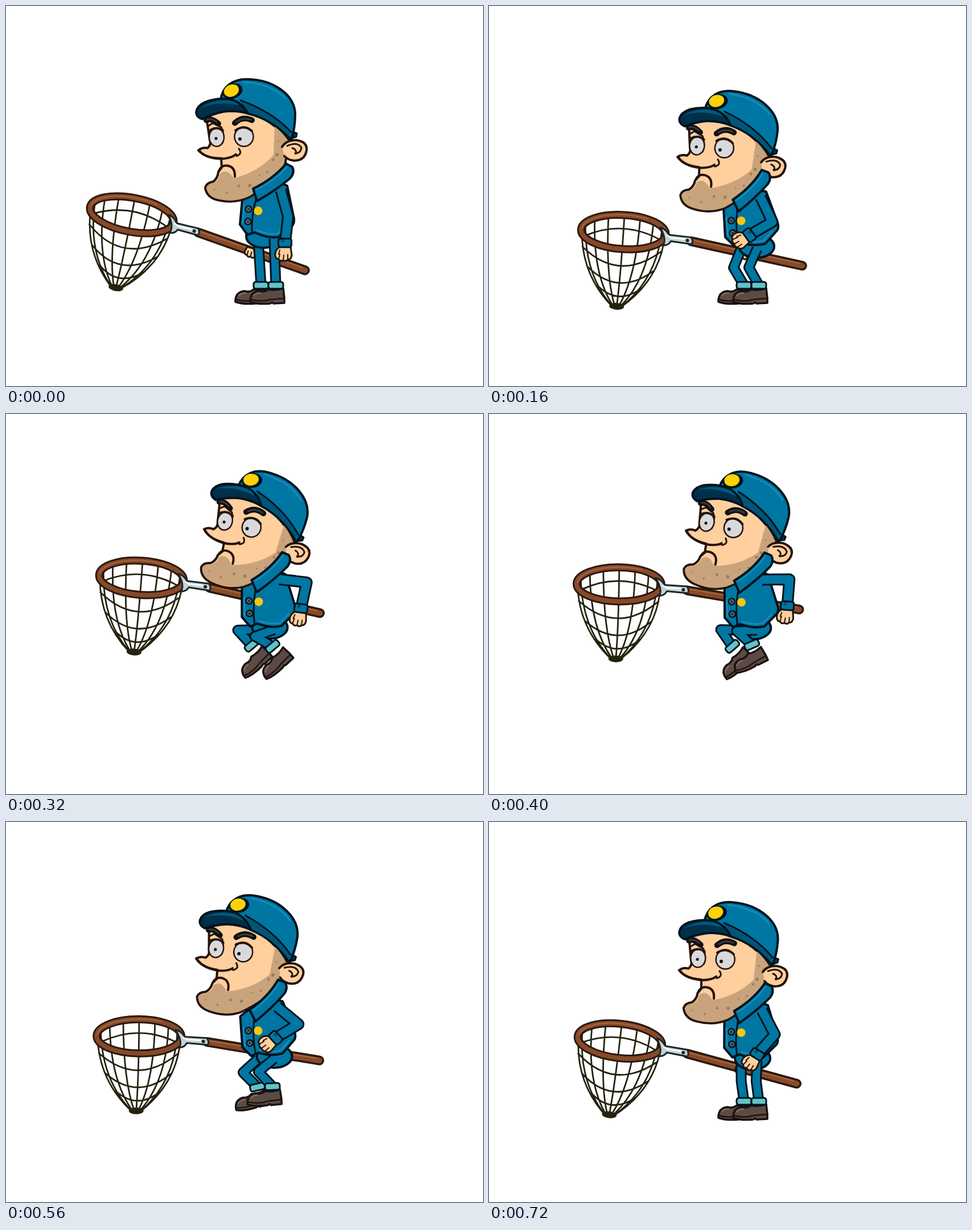
An HTML page that plays this animation: 838x668 px, repeating every 0.8 s.

```html
<!DOCTYPE html>
<html lang="en">
<head>
<meta charset="utf-8">
<title>Jumping net catcher</title>
<style>
  html, body { margin: 0; height: 100%; overflow: hidden; background: #fff; }
  svg { display: block; width: 100%; height: 100%; stroke-linejoin: round; stroke-linecap: round; }
  polyline { stroke-linecap: butt; }
  .edge { stroke: #00131d; }
  .ink { stroke: #25130b; stroke-width: 4; }
  .line { stroke: #00131d; stroke-width: 3; }
  .blue { fill: #0076a3; stroke: #00131d; stroke-width: 4; }
  .skin { fill: #ffcf9e; stroke: #25130b; stroke-width: 4; }
  .glow { stroke: #168fbd; stroke-width: 2.5; }
  .mesh { stroke: #25230f; stroke-width: 2.8; }
  .cloth { stroke: #0076a3; stroke-linecap: round; }
  .leather { fill: #5c4b45; stroke: #1c1210; stroke-width: 3.5; }
  .thin { stroke-width: 3; }
</style>
</head>
<body>
<svg viewBox="0 0 838 668" fill="none">
  <defs>
    <g id="shoe">
      <path class="leather" d="M-13 0Q-20 6-29 3Q-43 4-45 18L-45 22Q-32 27-10 25L-6 23L-4 25L15 24L15 15L13-2Q0 3-13 0Z"/>
      <path d="M-44 18Q-25 23-9 18L14 16" stroke="#1c1210" stroke-width="2.5"/>
      <path d="M-39 11Q-34 6-27 7" stroke="#85736c" stroke-width="2"/>
    </g>
    <rect id="cuff" x="-13" y="-6" width="26" height="12" rx="4" fill="#62c3c6" class="line"/>
  </defs>

  <g id="net">
    <path id="mesh" class="mesh"/>
    <ellipse cx="-4" cy="131" rx="13" ry="6" fill="#25230f"/>
    <path d="M120 9L317 40" stroke="#2a190c" stroke-width="17"/>
    <path d="M120 9L317 40" stroke="#87492a" stroke-width="10"/>
    <path d="M124 7L312 36" stroke="#a9663d" stroke-width="2"/>
    <ellipse rx="74.5" ry="30" stroke="#2a190c" stroke-width="14"/>
    <ellipse rx="74.5" ry="30" stroke="#87492a" stroke-width="8"/>
    <path d="M-73-3A74 29 0 0 1 40-26" stroke="#a9663d" stroke-width="2"/>
    <path d="M64-12Q74-10 80 0L119 2Q124 8 121 14L84 11Q80 19 71 19Q77 8 64-12Z" fill="#c6d3d6" stroke="#1d2526" stroke-width="3"/>
    <path d="M77 1L84 5L108 6" stroke="#fff" stroke-width="2.5"/>
    <circle cx="113" cy="8" r="3" fill="#1d2526"/>
    <g transform="translate(217 26) rotate(-10)">
      <path class="skin thin" d="M-6-9L6-6L8 9Q3 12 0 8Q-5 10-6 5Q-11 5-10-1Z"/>
      <path d="M-4-2L-6 5M2 0L0 8" stroke="#25130b" stroke-width="2"/>
    </g>
  </g>

  <g id="farFoot"><use href="#shoe"/></g>
  <g id="farLeg"></g>
  <g id="farCuff"><use href="#cuff"/></g>
  <g id="nearFoot"><use href="#shoe"/></g>
  <ellipse id="hips" class="blue" rx="31" ry="20"/>
  <g id="nearLeg"></g>
  <g id="nearCuff"><use href="#cuff"/></g>

  <g class="torso"><g transform="translate(-443 -360)">
    <path class="blue" d="M416 330L411 384L424 402L437 398Q460 409 479 406L502 387Q507 383 506 374L494 316Q465 300 416 330Z"/>
    <path class="line" d="M439 340Q431 368 432 398"/>
    <path class="glow" d="M441 394Q462 403 477 400L494 386M418 350L416 382"/>
    <g fill="#56707c" stroke="#00131d" stroke-width="2.5">
      <circle cx="426" cy="357" r="5.5"/>
      <circle cx="425" cy="379" r="5.5"/>
    </g>
    <path d="M424 355L428 359M428 355L424 359M423 377L427 381M427 377L423 381" class="edge"/>
    <circle cx="443" cy="360" r="7.5" fill="#f6c712"/>
  </g></g>

  <g id="head"><g transform="translate(-403.5 -243.2)">
    <path class="skin" d="M352 196L372 184L425 186Q470 202 497 236L490 280Q468 308 430 335Q405 348 375 342Q353 338 350 320Q352 311 364 309Q372 303 373 292L379 284L378 268Q350 268 338 254Q345 248 354 250Q361 244 358 236Z"/>
    <path fill="#c9a37b" d="M472 212Q485 222 495 236L488 279Q468 306 430 333Q405 346 375 340Q355 336 352 320Q354 313 366 311Q375 305 376 295Q388 284 400 303Q444 292 470 262Z"/>
    <g id="stubble" fill="#a07c5a"></g>
    <path class="ink" d="M339 254Q350 268 378 269Q396 268 404 261M374 290Q378 279 390 281Q403 284 402 300"/>
    <path class="ink thin" d="M409 251Q416 260 405 264M356 211L363 206L378 213Q384 224 381 240"/>
    <g fill="#d9d9dc" stroke="#25130b" stroke-width="2.5">
      <ellipse cx="370" cy="231" rx="13" ry="16"/>
      <ellipse cx="418" cy="230" rx="16.5" ry="17"/>
    </g>
    <path class="ink" d="M358 219Q370 211 381 219M403 219Q418 208 432 220"/>
    <g fill="#151515">
      <circle cx="369" cy="233" r="2.6"/>
      <circle cx="411" cy="234" r="3"/>
    </g>
    <path stroke="#101012" stroke-width="10" d="M352 201Q360 196 373 207M402 206Q415 193 432 201"/>
    <path stroke="#3a393b" stroke-width="3" d="M353 200Q361 197 370 204M405 204Q416 195 430 200"/>
    <path class="skin" d="M485 248Q492 236 510 236Q530 239 528 254Q525 272 506 272Q495 271 489 264"/>
    <path class="ink thin" d="M494 246Q512 238 519 249Q518 259 508 259M503 250Q511 252 509 260"/>
    <path fill="#00334b" class="line" d="M497 226L503 221L511 224L510 230L499 234Z"/>
    <path class="blue" d="M377 166C380 142 398 128 425 129C470 130 507 156 508 190Q508 216 501 235Q470 200 424 189Z"/>
    <path fill="#005578" d="M412 168Q468 188 499 221L500 232Q468 198 424 187Z"/>
    <path class="line" d="M412 166Q468 186 501 222"/>
    <path class="glow" d="M417 134Q468 137 491 163"/>
    <path fill="#003049" class="edge" stroke-width="4" d="M345 199C329 194 331 178 350 169Q372 161 393 164Q414 169 425 189Q404 183 382 186Q362 190 345 199Z"/>
    <path fill="#00587d" d="M341 180Q364 164 392 166Q404 168 410 175Q372 166 341 180Z"/>
    <ellipse cx="398" cy="150" rx="18" ry="13" fill="#00131d" transform="rotate(-20 398 150)"/>
    <ellipse cx="396" cy="149" rx="13.5" ry="10.5" fill="#ffd108" transform="rotate(-22 396 149)"/>
  </g></g>

  <g id="arm"></g>
  <g id="hand">
    <path class="skin thin" d="M-8 5Q-18 10-17 21Q-16 27-11 27Q-8 32-3 29Q2 32 5 28Q11 28 12 20L10 5Z"/>
    <path stroke="#25130b" stroke-width="2" d="M-11 27L-9 18M-3 29L-2 20M5 28L5 19M-9 11L-11 18"/>
    <rect class="blue thin" x="-11.5" y="-9" width="23" height="15" rx="4"/>
    <circle cx="-4" cy="-5" r="2" class="edge" fill="#56707c"/>
  </g>
  <g class="torso"><g transform="translate(-443 -360)">
    <path class="blue" d="M434 321Q470 304 492 277L503 283Q508 293 499 303Q474 324 441 343Z"/>
    <path class="glow" d="M440 323Q474 306 493 283"/>
  </g></g>
</svg>

<script>
const STEP = 80;
const $ = id => document.getElementById(id);

// Each part is x, y, angle. Hips, knees and elbow follow from these.
const grounded = { farFoot: [448, 498, 0], nearFoot: [474, 498, 0] };
const stand = { head: [403.5, 243, 0], net: [221, 367, 10.6], torso: [443, 360, 0], hand: [490, 418, 0], ...grounded };
const crouch = { head: [396, 266, 7.5], net: [240, 405, 1.7], torso: [443, 382, -10.7], hand: [448, 400, 68], ...grounded };
const leap = {
  head: [414, 208.5, 14.6], net: [238, 288, 4], torso: [444, 330, -5.3], hand: [518, 343, 8],
  farFoot: [441, 418, -40], nearFoot: [478, 420, -40]
};
const hang = {
  head: [410.5, 211, 12.2], net: [219, 311, -2.5], torso: [443, 332, -6], hand: [530, 334, 0],
  farFoot: [434, 422, -42], nearFoot: [455, 413, -8]
};

// Per step: two poses, the share of the second, and how far the head lags upward.
const steps = [
  [stand, crouch, 0], [stand, crouch, .55], [stand, crouch, .8], [stand, crouch, 1],
  [leap, hang, 0], [leap, hang, .5], [leap, hang, 1],
  [crouch, hang, .3, 10], [stand, crouch, .8], [stand, crouch, .47]
];

function offset([x, y, deg], dx, dy) {
  const a = deg * Math.PI / 180, c = Math.cos(a), s = Math.sin(a);
  return [x + dx * c - dy * s, y + dx * s + dy * c];
}

function place(el, [x, y, deg = 0]) {
  el.setAttribute('transform', `translate(${x} ${y}) rotate(${deg})`);
}

function makeLimb(id, width) {
  $(id).innerHTML = `<polyline class="edge" stroke-width="${width + 6}"/>
    <polyline class="cloth" stroke-width="${width}"/>`;
}

// Two equal bones; side 1 bends the joint to the left, -1 to the right.
function bend(id, [x1, y1], [x2, y2], bone, side) {
  const dx = x2 - x1, dy = y2 - y1, d = Math.hypot(dx, dy);
  const out = side * Math.sqrt(Math.max(0, bone * bone - d * d / 4)) / d;
  const joint = [(x1 + x2) / 2 - dy * out, (y1 + y2) / 2 + dx * out];
  for (const line of $(id).children) line.setAttribute('points', `${x1},${y1} ${joint} ${x2},${y2}`);
}

function makeMesh() {
  let d = 'M-66 10Q0-22 66 10';
  for (let k = -4; k <= 4; k++) {
    const a = k * Math.PI / 8, x = 73 * Math.sin(a), y = -29 * Math.cos(a);
    d += `M${x} ${y}Q${x * .96} 78 ${x * .12 - 4} 131`;
  }
  for (let t = .2; t < .8; t += .25) {
    const w = 73 - 6 * t - 62 * t * t, y = 156 * t - 25 * t * t;
    d += `M${-w - 1} ${y}Q-2 ${y + w * .85} ${w - 1} ${y}`;
  }
  $('mesh').setAttribute('d', d);
}

function makeStubble() {
  for (let i = 0; i < 9; i++) {
    const a = i * Math.PI / 16, x = 366 + 112 * Math.sin(a), y = 238 + 85 * Math.cos(a) + i % 2 * 7;
    $('stubble').innerHTML += `<circle cx="${x}" cy="${y}" r="${1.4 + i % 4 * .5}"/>`;
  }
}

function draw([from, to, share, lag = 0]) {
  const p = {};
  for (const part in from) {
    p[part] = from[part].map((v, i) => v + (to[part][i] - v) * share);
  }
  p.head[1] -= lag;
  const [, y, lean] = p.torso;
  const hips = [453 - 2 * lean, y + 45];

  for (const part of ['head', 'net', 'hand', 'farFoot', 'nearFoot']) place($(part), p[part]);
  for (const el of document.querySelectorAll('.torso')) place(el, p.torso);
  place($('hips'), hips);
  for (const [side, hipX] of [['far', 443], ['near', 471]]) {
    const foot = p[side + 'Foot'];
    const ankle = offset(foot, 0, -7 + foot[2] / 5);
    bend(side + 'Leg', [hipX, hips[1] + 4], ankle, 36, 1);
    place($(side + 'Cuff'), [...ankle, foot[2]]);
  }
  bend('arm', offset(p.torso, 40, -36), p.hand, 48, -1);
}

function tick() {
  draw(steps[Math.floor(performance.now() / STEP) % steps.length]);
  requestAnimationFrame(tick);
}

makeLimb('farLeg', 13);
makeLimb('nearLeg', 13);
makeLimb('arm', 15);
makeMesh();
makeStubble();
tick();
</script>
</body>
</html>
```
